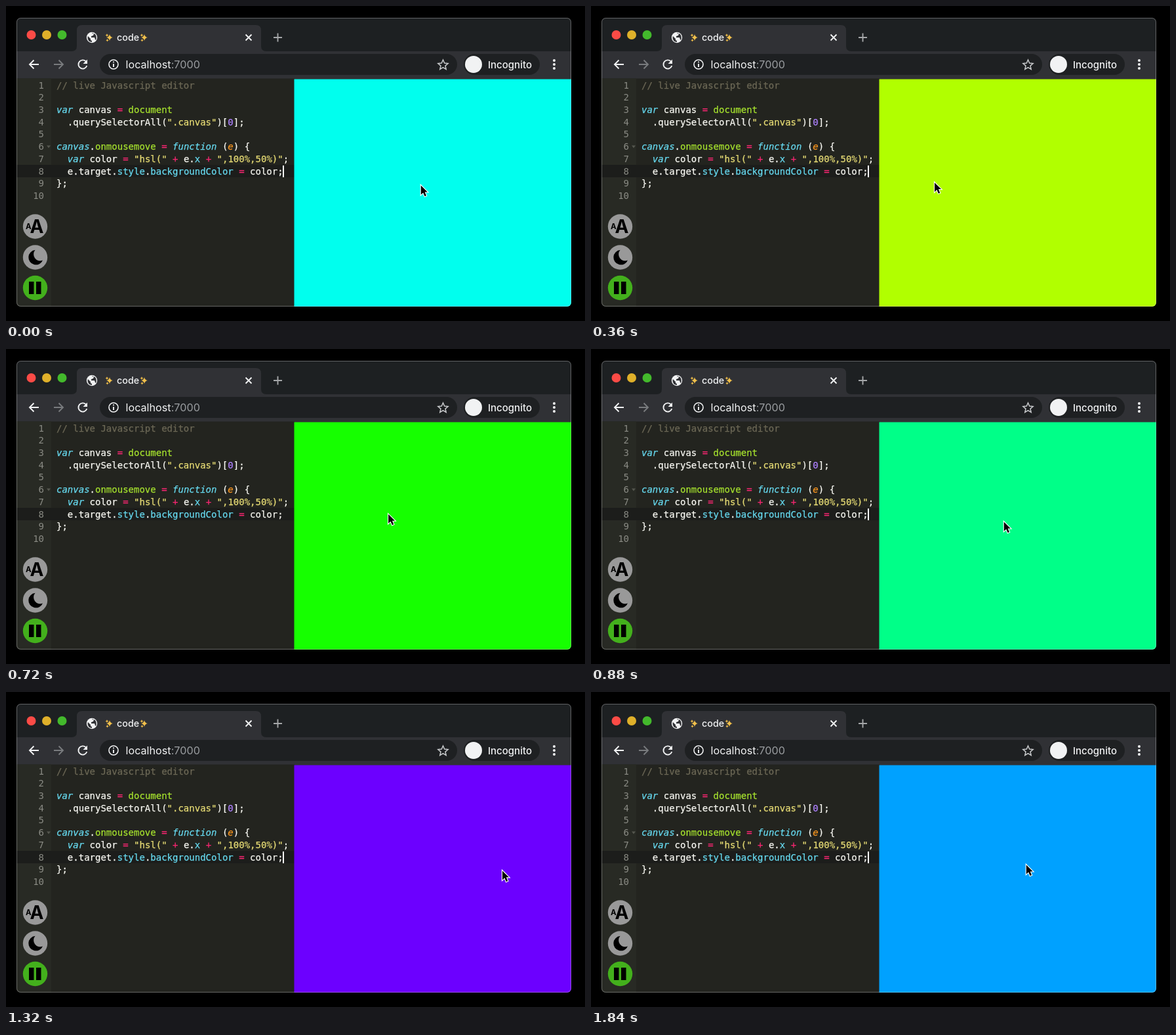
Write an HTML page that moves like this. It is 883x480 px and loops after 1880 ms.

```html
<!DOCTYPE html>
<html lang="en">
<head>
<meta charset="utf-8">
<title>Live editor</title>
<style>
  html, body { margin: 0; width: 100%; height: 100%; overflow: hidden; background: #000; }
  svg { display: block; }
  .ui { font-family: Inter, Roboto, sans-serif; fill: #f1f2f3; }
  .code, .nums { font: 14px "DejaVu Sans Mono", "Liberation Mono", monospace; color: #f8f8f2; }
  .code text { white-space: pre; }
  .code text, .code tspan { fill: currentColor; stroke: currentColor; stroke-width: .25; }
  .nums { fill: #8a8b84; text-anchor: end; }
  .cm { color: #6c6856; }
  .kw { color: #66d9ef; font-style: italic; }
  .pr { color: #66d9ef; }
  .fn { color: #a6e22e; }
  .op { color: #f92672; }
  .st { color: #e6db74; }
  .nu { color: #ae81ff; }
  .ar { color: #fd971f; font-style: italic; }
  .line { fill: none; stroke: #f1f2f3; stroke-width: 1.9; }
</style>
</head>
<body>
<svg width="883" height="480" viewBox="0 0 883 480">
  <defs>
    <clipPath id="win"><rect x="16" y="18" width="846" height="440" rx="6"/></clipPath>
    <g id="sparkle" fill="#f3c04b">
      <path d="M0-5Q.8-.8 5 0Q.8.8 0 5Q-.8.8-5 0Q-.8-.8 0-5Z"/>
      <path d="M-4-6l.8 1.7 1.7.8-1.7.8-.8 1.7-.8-1.7-1.7-.8 1.7-.8zM-3.5 2l.7 1.5 1.5.7-1.5.7-.7 1.5-.7-1.5-1.5-.7 1.5-.7z"/>
    </g>
  </defs>

  <g clip-path="url(#win)">
    <!-- tab strip and toolbar -->
    <rect x="16" y="18" width="846" height="51" fill="#1d2022"/>
    <path d="M100 69Q108 69 108 61V37Q108 29 116 29H381Q389 29 389 37V61Q389 69 397 69H862V112H16V69Z" fill="#303135"/>
    <circle cx="38.5" cy="44" r="7" fill="#fb4b46"/>
    <circle cx="62" cy="44" r="7" fill="#dfb02a"/>
    <circle cx="85.5" cy="44" r="7" fill="#43b92c"/>

    <circle cx="131" cy="48" r="8.2" fill="#f1f2f3"/>
    <path d="M125 46l4 4v2l2 1v2Q124 54 124.5 47ZM131 42h3l-1 3-3 1v2h5l1 3 1 1Q139 47 136 43L132 41Z" fill="#303135"/>
    <use href="#sparkle" x="158" y="48"/>
    <text class="ui" x="169" y="53" font-size="14.3" font-weight="500">code</text>
    <use href="#sparkle" x="211" y="48"/>
    <path class="line" d="M365.5 43.5l9 9m0-9l-9 9"/>
    <path class="line" d="M408 48h13m-6.5-6.5v13" style="stroke:#a5a7a9"/>

    <path class="line" d="M50 89H36m6.5-6.5L36 89l6.5 6.5"/>
    <path class="line" d="M73 89h14m-6.5-6.5L87 89l-6.5 6.5" style="stroke:#797b7e"/>
    <path class="line" d="M122.3 85A6.6 6.6 0 1 0 123.3 91"/>
    <path d="M124 81.5v6.5h-6.5z" fill="#f1f2f3"/>
    <rect x="143" y="73" width="545" height="32" rx="16" fill="#1e2022"/>
    <circle class="line" cx="164" cy="89" r="7" style="stroke-width:1.6"/>
    <path class="line" d="M164 88v5m0-8.5v1.8"/>
    <text class="ui" x="182.5" y="95" font-size="16.2">localhost<tspan fill="#9a9da0">:7000</tspan></text>
    <path class="line" d="M666.5 82l2.2 5 5.4.5-4.1 3.6 1.2 5.4-4.7-2.8-4.7 2.8 1.2-5.4-4.1-3.6 5.4-.5z" style="stroke:#c9cbcd;stroke-width:1.5"/>
    <rect x="698" y="73" width="116" height="32" rx="16" fill="#1e2022"/>
    <circle cx="713" cy="89" r="13" fill="#f1f2f3"/>
    <text class="ui" x="735" y="95" font-size="15" font-weight="500">Incognito</text>
    <g fill="#f1f2f3">
      <circle cx="836" cy="83" r="2"/><circle cx="836" cy="89" r="2"/><circle cx="836" cy="95" r="2"/>
    </g>

    <!-- editor -->
    <rect x="16" y="110.5" width="424" height="348" fill="#23241f"/>
    <rect x="16" y="110.5" width="53" height="348" fill="#282a24"/>
    <rect x="16" y="242" width="424" height="19" fill="#1c1d1b"/>
    <g id="nums" class="nums"></g>
    <path d="M62 212.5h6l-3 4z" fill="#55564f"/>
    <g class="code" id="code">
      <text><tspan class="cm">// live Javascript editor</tspan></text>
      <text></text>
      <text><tspan class="kw">var</tspan> canvas <tspan class="op">=</tspan> <tspan class="fn">document</tspan></text>
      <text>  .querySelectorAll(<tspan class="st">".canvas"</tspan>)[<tspan class="nu">0</tspan>];</text>
      <text></text>
      <text><tspan class="kw">canvas</tspan>.<tspan class="fn">onmousemove</tspan> <tspan class="op">=</tspan> <tspan class="kw">function</tspan> (<tspan class="ar">e</tspan>) {</text>
      <text>  <tspan class="kw">var</tspan> color <tspan class="op">=</tspan> <tspan class="st">"hsl("</tspan> <tspan class="op">+</tspan> e.<tspan class="pr">x</tspan> <tspan class="op">+</tspan> <tspan class="st">",100%,50%)"</tspan>;</text>
      <text>  e.target.<tspan class="pr">style</tspan>.<tspan class="pr">backgroundColor</tspan> <tspan class="op">=</tspan> color;</text>
      <text>};</text>
    </g>
    <rect id="caret" x="422" y="243" width="2" height="18" fill="#fff"/>

    <!-- round buttons -->
    <g fill="#999">
      <circle cx="44.5" cy="336" r="18.7"/>
      <circle cx="44.5" cy="383" r="18.7"/>
      <circle cx="44.5" cy="429.5" r="18.7" fill="#43b01c"/>
    </g>
    <g font-family="Inter, Roboto, sans-serif" font-weight="700">
      <text x="30" y="340" font-size="11.5">A</text>
      <text x="36.5" y="346" font-size="28">A</text>
    </g>
    <path d="M44.5 371.8A11.3 11.3 0 1 0 56 387.5A10 10 0 0 1 44.5 371.8Z"/>
    <path d="M35 420h7.5v19H35zM46 420h7.5v19H46z"/>

    <rect id="canvas" x="439.5" y="111.5" width="423" height="347"/>
  </g>
  <rect x="16.5" y="18.5" width="845" height="439" rx="6" fill="none" stroke="#fff" stroke-opacity=".3"/>
  <path id="pointer" d="M.8 1.5V15.5L4.2 12.4 6.6 18 9 17 6.7 11.4H10.8Z" stroke="#fff" stroke-width="2.2" paint-order="stroke"/>
</svg>
<script>
const $ = id => document.getElementById(id);
const LOOP = 1880, STEP = 40;

// time, pointer x, pointer y, hue
const path = [
  [0, 632, 272, 176],
  [200, 558, 285, 108],
  [390, 521, 264, 76],
  [560, 543, 245, 86],
  [880, 629, 262, 152],
  [1120, 718, 288, 230],
  [1370, 759, 265, 269],
  [1600, 728, 235, 251],
  [1840, 663, 262, 202]
];

function slope(i, k) {
  const a = path[Math.max(i - 1, 0)], b = path[Math.min(i + 1, path.length - 1)];
  return (b[k] - a[k]) / (b[0] - a[0]);
}

// smooth curve through the path points
function at(t, k) {
  let i = 0;
  while (i < path.length - 2 && path[i + 1][0] <= t) i++;
  const [a, b] = [path[i], path[i + 1]], d = b[0] - a[0], u = (t - a[0]) / d, v = 1 - u;
  return v * v * ((1 + 2 * u) * a[k] + u * d * slope(i, k))
       + u * u * ((3 - 2 * u) * b[k] - v * d * slope(i + 1, k));
}

const rowY = i => 125.6 + i * 18.72;
[...$("code").children].forEach((row, i) => {
  row.setAttribute("x", 77);
  row.setAttribute("y", rowY(i));
});
$("nums").innerHTML = Array.from({ length: 10 }, (_, i) =>
  `<text x="58" y="${rowY(i)}">${i + 1}</text>`).join("");

function draw(now) {
  const t = Math.floor(now % LOOP / STEP) * STEP;
  $("pointer").setAttribute("transform", `translate(${at(t, 1)} ${at(t, 2)})`);
  $("canvas").setAttribute("fill", `hsl(${at(t, 3)}, 100%, 50%)`);
  const blink = t % 1000;
  $("caret").setAttribute("visibility", blink >= 400 && blink < 800 ? "hidden" : "visible");
}

const start = performance.now();
function tick() {
  draw(performance.now() - start);
  requestAnimationFrame(tick);
}
tick();
</script>
</body>
</html>
```
